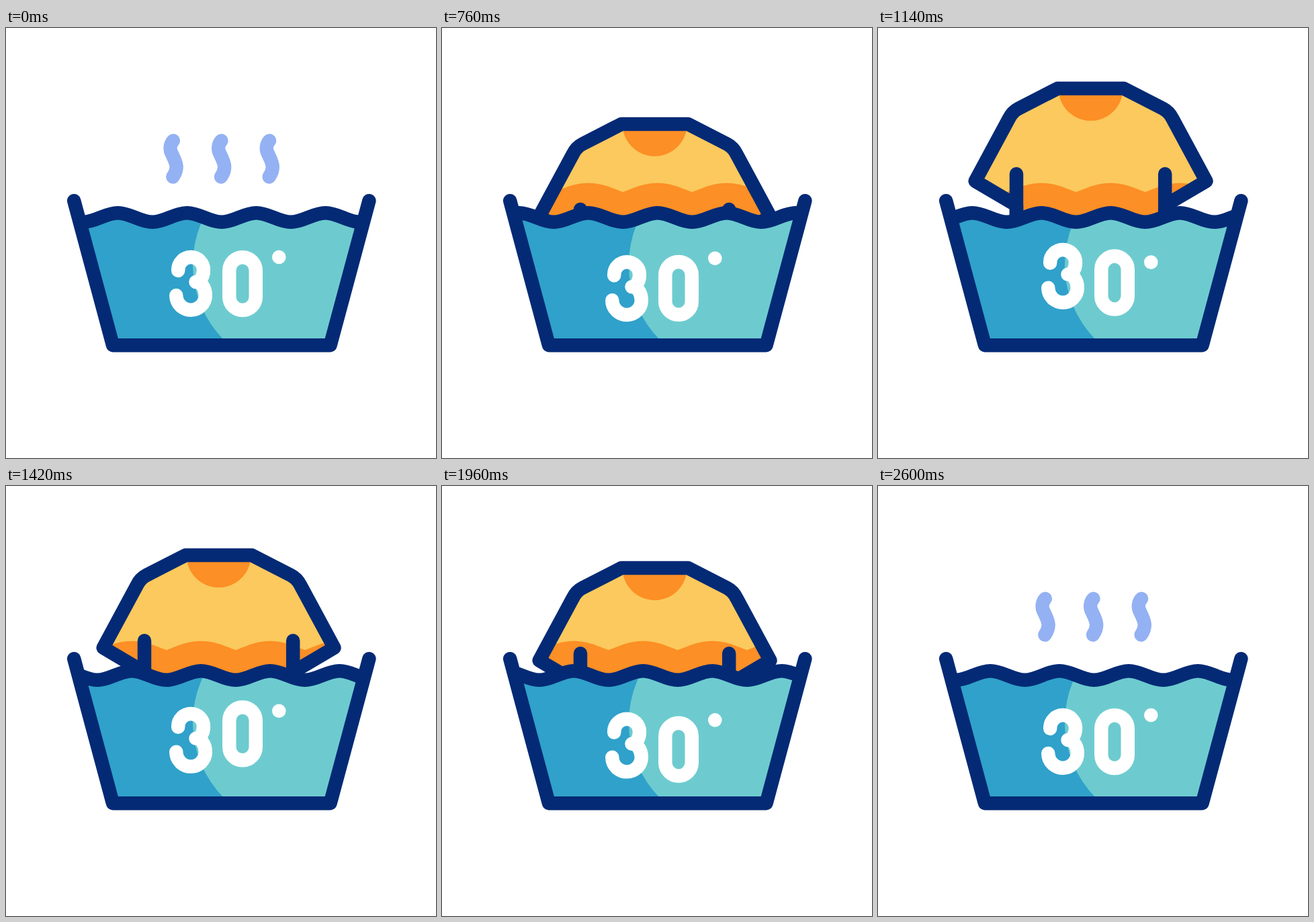
Recreate the animation shown at these times as an HTML page. Size 640 px wide and 640 px high, loop 3000 ms.

```html
<!DOCTYPE html>
<html lang="en">
<head>
<meta charset="utf-8">
<title>Wash at 30 degrees</title>
<style>
  html, body { margin: 0; width: 100%; height: 100%; overflow: hidden; background: #fff; }
  svg { display: block; width: 100%; height: 100%; }
  .line { fill: none; stroke-width: 20.5; stroke-linecap: round; stroke-linejoin: round; }
  .navy { stroke: #042a75; }
  .white { stroke: #fff; }
  .steam { stroke: #94b1f3; }
</style>
</head>
<body>
<svg viewBox="0 0 640 640">
  <defs>
    <path id="steam" pathLength="1" d="M248.9 167.8C244.5 172.5 243.5 180 246 185.5C248.5 191 253.2 199 253.6 206C253.8 212 251.5 217 248.4 221.6"/>
    <clipPath id="tub"><path d="M101.2 257.2L159 472.2H482.6L540.4 257.2Z"/></clipPath>
    <clipPath id="air"><path class="wave" data-close="V-50H-103Z"/></clipPath>
    <clipPath id="cloth"><path class="shirt body"/></clipPath>
  </defs>

  <g id="puffs" class="line steam">
    <use href="#steam"/>
    <use href="#steam" x="71.6"/>
    <use href="#steam" x="143.2"/>
  </g>

  <g clip-path="url(#air)">
    <g class="shirt">
      <path class="body" fill="#fbc95d"/>
      <path d="M268.6 0A48 48 0 0 0 364.6 0Z" fill="#fc8f25"/>
    </g>
    <g clip-path="url(#cloth)">
      <path class="wave" fill="none" stroke="#fc8f25" stroke-width="89"/>
    </g>
    <g class="shirt line navy">
      <path class="body"/>
      <path d="M206 127.2V400M427.2 127.2V400"/>
    </g>
  </g>

  <g clip-path="url(#tub)">
    <path class="wave" data-close="V520H-103Z" fill="#6dcbcf"/>
    <g clip-path="url(#sea)">
      <path d="M0 200H380L437.5 192.5A159.5 159.5 0 0 0 437.5 511.5H0Z" fill="#30a1ca"/>
    </g>
    <path class="wave line navy"/>
  </g>
  <clipPath id="sea"><path class="wave" data-close="V520H-103Z"/></clipPath>
  <path class="line navy" d="M101.2 257.2L159 472.2H482.6L540.4 257.2"/>

  <path class="glyph line white" d="M256.2 361V360A18.9 18.9 0 0 1 294 360C294 370 289 378 282.5 378C290 378 296.8 386 296.8 398A21.75 21.75 0 0 1 253.3 398"/>
  <rect class="glyph line white" x="332.3" y="341.2" width="39.5" height="78.9" rx="19.75"/>
  <circle class="glyph" cx="406.3" cy="341" r="10.3" fill="#fff"/>
</svg>

<script>
  const LOOP = 3000, STEP = 20, PERIOD = 103, HALF = PERIOD / 2;
  const CREST = 275.2, TROUGH = 288.8, BEND = 18.5;
  const all = s => [...document.querySelectorAll(s)];

  // Each track is a list of [time, value], eased between neighbours.
  const tracks = {
    wave: [[210, 0], [785, -52], [2600, 206.7]],
    shirt: [[345, 298.2], [990, 79.2], [1330, 105.7], [1790, 79.2], [2390, 298.2]],
    glyph: [[215, 0], [690, 8.2], [1200, -12], [1700, 12], [2200, 0]],
    rise: [[215, 0], [605, -20]],
    cut: [[215, 1], [605, 0]],
    grow: [[2210, 0], [2600, 1]]
  };

  function at(keys, t) {
    if (t <= keys[0][0]) return keys[0][1];
    for (let i = 1; i < keys.length; i++) {
      const [t0, a] = keys[i - 1], [t1, b] = keys[i];
      if (t < t1) {
        const p = (t - t0) / (t1 - t0);
        return a + (b - a) * p * p * (3 - 2 * p);
      }
    }
    return keys[keys.length - 1][1];
  }

  function wavePath() {
    let x = 166.4 - 4 * PERIOD, d = `M${x} ${CREST}`;
    for (let i = 0; i < 20; i++) {
      const from = i % 2 ? TROUGH : CREST, to = i % 2 ? CREST : TROUGH;
      d += `C${x + BEND} ${from} ${x + HALF - BEND} ${to} ${x + HALF} ${to}`;
      x += HALF;
    }
    return d;
  }

  function bodyPath() {
    return "M267.2 0H366L424 29.7Q433.5 34.5 438.5 45L488.5 137.7L427.2 173.9V420" +
           "H206V173.9L144.7 137.7L194.7 45Q199.7 34.5 209.2 29.7Z";
  }

  const waves = all(".wave"), shirts = all(".shirt"), glyphs = all(".glyph");
  const puffs = document.getElementById("puffs"), steam = document.getElementById("steam");
  const curve = wavePath();
  waves.forEach(w => w.setAttribute("d", curve + (w.dataset.close || "").replace("H-103", "H-245.6")));
  all(".body").forEach(b => b.setAttribute("d", bodyPath()));

  const move = (el, x, y) => el.setAttribute("transform", `translate(${x} ${y})`);

  function drawSteam(t) {
    const leaving = t < 1400;
    const len = at(leaving ? tracks.cut : tracks.grow, t);
    puffs.style.display = len > 0.001 ? "" : "none";
    steam.setAttribute("stroke-dasharray", len < 1 ? `${len} 3` : "none");
    steam.setAttribute("stroke-dashoffset", leaving ? 0 : len - 1);
    move(puffs, 0, leaving ? at(tracks.rise, t) : 0);
  }

  function draw(t) {
    const shift = at(tracks.wave, t) % PERIOD;
    waves.forEach(w => move(w, shift, 0));
    const y = at(tracks.shirt, t);
    shirts.forEach(s => move(s, 0, y));
    glyphs.forEach((g, i) => move(g, 0, at(tracks.glyph, t - i * 200)));
    drawSteam(t);
  }

  const start = performance.now();
  function tick() {
    const t = (performance.now() - start) % LOOP;
    draw(Math.floor(t / STEP) * STEP);
    requestAnimationFrame(tick);
  }
  draw(0);
  tick();
</script>
</body>
</html>
```
